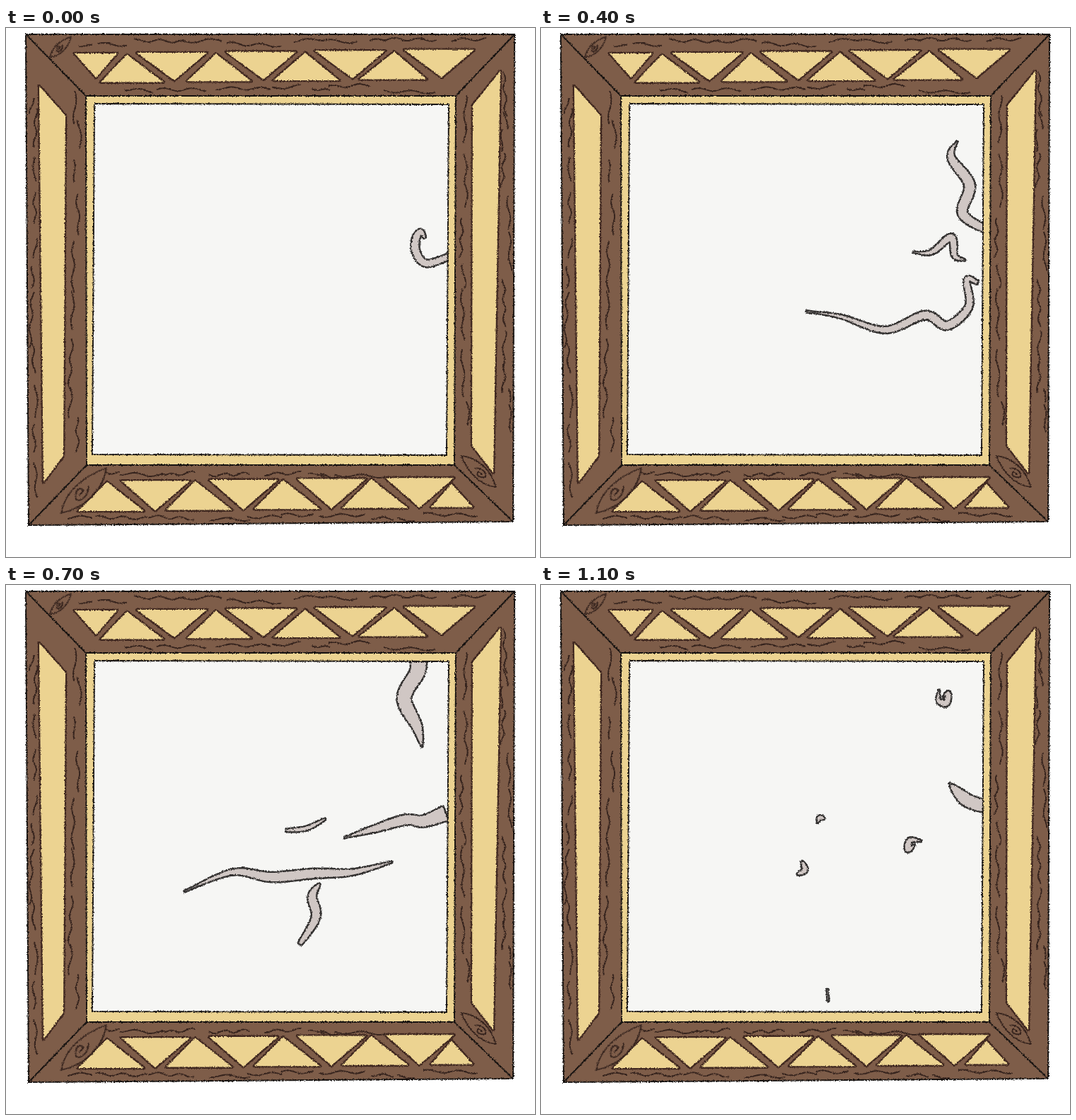
Write an HTML page that moves like this. It is 748 by 748 pixels and loops after 1200 ms.

```html
<!DOCTYPE html>
<html lang="en">
<head>
<meta charset="utf-8">
<title>Smoke in a wooden frame</title>
<style>
  html, body { margin: 0; width: 100%; height: 100%; overflow: hidden; background: #fff; }
  svg { display: block; width: 100vw; height: 100vh; }
  .ink { fill: none; stroke: #171311; stroke-width: 1.9; }
  .wood { fill: #7e5d49; stroke: #171311; stroke-width: 2; }
  .sand { fill: #ecd391; stroke: #171311; stroke-width: 1.9; }
  .inlay { fill: #ecd391; stroke: #402820; stroke-width: 4.6; stroke-linejoin: round; paint-order: stroke; }
  .grain { fill: none; stroke: #35231d; stroke-width: 1.9; stroke-linecap: round; vector-effect: non-scaling-stroke; }
  .paper { fill: #f6f6f4; }
  #edge { fill: none; stroke: #333130; stroke-width: 5; stroke-linejoin: round; }
  #body { fill: #d0c7c4; }
</style>
</head>
<body>
<svg viewBox="0 0 748 748">
  <defs>
    <filter id="rough" filterUnits="userSpaceOnUse" x="0" y="0" width="748" height="748" color-interpolation-filters="sRGB">
      <feTurbulence type="fractalNoise" baseFrequency="0.55" numOctaves="2" seed="4"/>
      <feDisplacementMap in="SourceGraphic" scale="3.4" xChannelSelector="R" yChannelSelector="G"/>
    </filter>
    <path id="pane" d="M125 107L626 108L623 604L122 603Z"/>
    <clipPath id="inside"><use href="#pane"/></clipPath>
  </defs>
  <g id="frame" filter="url(#rough)"></g>
  <use href="#pane" class="paper"/>
  <g clip-path="url(#inside)">
    <g filter="url(#rough)"><path id="edge"/><path id="body"/></g>
  </g>
  <g filter="url(#rough)"><use href="#pane" class="ink"/></g>
</svg>
<script>
const frame = document.getElementById('frame');
const mix = (a, b, u) => a + (b - a) * u;

function add(cls, d, transform = '') {
  const p = document.createElementNS('http://www.w3.org/2000/svg', 'path');
  p.setAttribute('class', cls);
  p.setAttribute('d', d);
  p.setAttribute('transform', transform);
  frame.append(p);
}

// Boards, mitres and side panels
add('wood', 'M28 9L719 9L717 698L32 703Z');
add('ink', 'M28 9L113 96M719 9L636 96M32 703L114 618M717 698L634 618');
add('sand', 'M113 96L636 96L634 618L114 618Z');
add('inlay', 'M47 82L84 124L81 605L53 642Z');
add('inlay', 'M699 61L660 109L659 590L689 629Z');

// Rows of triangles, rising slightly to the right
function triangle(left, right, tip, base, apex) {
  const rise = 0.011 * (left - 97);
  add('inlay', `M${left} ${base - rise}L${right} ${base - rise}L${tip} ${apex - rise}Z`);
}
triangle(97, 157, 127, 36, 70);
triangle(601, 660, 630, 683, 650);
for (let k = 0; k < 4; k++) {
  const top = 126 * k, low = 124.5 * k;
  triangle(134 + 122 * k, 223 + 124 * k, 171 + top, 77, 38);
  triangle(185 + top, 284 + top, 238 + top, 36, 75);
  triangle(102 + low, 195 + low, 143 + low, 683, 642);
  triangle(163 + low, 260 + low, 211 + low, 641, 683);
}

// Wood grain: wavy strokes scattered along lanes
let seed = 7;
const rand = () => (seed = seed * 16807 % 2147483647) / 2147483647;

function grain(x, y, length, vertical) {
  const wave = mix(26, 48, rand()), phase = rand() * 6.3, tilt = mix(-4, 4, rand());
  const pts = [];
  for (let s = 0; s <= length; s += 3) {
    const off = tilt * s / length + 2 * Math.sin(s / wave * 6.28 + phase);
    pts.push(vertical ? `${x + off} ${y + s}` : `${x + s} ${y + off}`);
  }
  add('grain', 'M' + pts.join('L'));
}

function lane(across, from, to, spread, vertical) {
  for (let pos = from; pos < to - 15;) {
    const length = Math.min(to - pos, mix(20, 80, rand()));
    const side = across + mix(-spread, spread, rand());
    if (vertical) grain(side, pos, length, true);
    else grain(pos, side, length, false);
    pos += length + mix(-8, 22, rand());
  }
}
lane(20, 103, 685, 5, false);
lane(86, 168, 616, 4, false);
lane(630, 142, 557, 3, false);
lane(691, 88, 680, 4, false);
lane(40, 100, 665, 3, true);
lane(98, 90, 600, 6, true);
lane(649, 96, 562, 5, true);
lane(707, 62, 572, 5, true);

// A knot is a leaf shape with a small ring
function knot(x, y, size, angle) {
  add('grain', 'M-.5 0C-.2 -.22 .2 -.2 .5 0C.2 .22 -.2 .14 -.5 0M-.1 0C0 -.12 .2 -.1 .18 0C.1 .1 0 .1 0 0L.1 0',
    `translate(${x} ${y}) rotate(${angle}) scale(${size})`);
}
knot(77, 27, 42, 135);
knot(110, 654, 90, 135);
knot(668, 627, 66, 42);

// Smoke wisps by step: [thickness, share left at the first end, at the last end, spine]
const wisps = [
  {
    0: [6.5, .4, .8, '592,296 586,288 579,300 581,320 596,333 629,322'],
    2: [9, 1.1, .5, '593,244 588,270 582,300 591,328 629,320'],
    4: [8.5, .1, .7, '588,161 580,183 606,222 596,262 629,285'],
    6: [8.5, .9, .2, '573,99 571,122 560,152 591,197 596,235 598,268'],
    7: [11, 1.2, .1, '582,99 582,122 563,160 581,200 588,228'],
    9: [6.5, .5, .2, '571,110 562,140 568,157 581,159 583,139 576,148'],
    11: [5.5, .2, .2, '563,149 562,163 573,167 576,153 569,158']
  },
  {
    2: [6, .2, 1.6, '524,286 540,289 558,284 575,264 594,245'],
    4: [6, .1, .3, '527,317 552,317 580,296 585,322 599,328'],
    6: [5, .2, .2, '448,337 470,336 487,327 516,323'],
    7: [4, .7, .5, '397,347 425,344 451,331'],
    9: [5, .8, .2, '392,337 394,326 405,326 405,340'],
    11: [4, .6, .2, '400,330 394,329 391,336']
  },
  {
    2: [6.5, .1, .6, '513,425 533,387 562,391 594,405 607,385 602,357 629,366'],
    4: [7, .1, .5, '376,401 424,408 487,427 543,406 574,421 605,394 602,356 617,360'],
    6: [10.5, .1, .5, '284,406 340,415 400,417 445,409 488,414 535,396 588,400'],
    7: [8, .1, .2, '253,433 320,406 375,413 435,408 490,406 545,392'],
    9: [6.5, .5, .3, '361,389 349,394 352,410 370,415 402,405'],
    11: [5, .4, .4, '369,391 373,403 363,409']
  },
  {
    6: [8, .1, 1.3, '429,491 434,470 431,440 443,418'],
    7: [7.5, .5, .3, '416,507 438,470 433,440 443,423'],
    9: [4.5, .2, .2, '414,558 417,540 410,518 412,498'],
    11: [1.5, 1, 1, '406,588 405,572']
  },
  {
    6: [5.5, .1, 1.1, '543,350 567,332 600,336 629,327'],
    7: [8, .1, 1.5, '479,357 520,345 565,332 590,334 621,323'],
    9: [7.5, .3, .1, '534,351 543,366 527,381 517,350 520,324 555,309 592,318'],
    11: [5.5, .3, .2, '528,368 519,374 522,361 537,362']
  },
  { 11: [10, .1, 1, '578,281 602,304 629,313'] },
  { 2: [4, .2, 1, '616,266 592,269'] },
  { 2: [4, .2, 1, '612,281 590,285'] }
];

const SAMPLES = 48, STEPS = 12, STEP_MS = 100;

// Catmull-Rom spine with a sine swell in thickness, as [x, y, half-width]
function sample([size, head, tail, spine]) {
  const k = spine.split(' ').map(p => p.split(',').map(Number)), last = k.length - 1;
  const at = i => k[Math.max(0, Math.min(last, i))];
  return Array.from({ length: SAMPLES + 1 }, (_, n) => {
    const v = n / SAMPLES, i = Math.min(last - 1, Math.floor(v * last)), u = v * last - i;
    const [x, y] = [0, 1].map(c => {
      const [a, b, d, e] = [-1, 0, 1, 2].map(o => at(i + o)[c]);
      return b + 0.5 * u * (d - a + u * (2 * a - 5 * b + 4 * d - e + u * (3 * (b - d) + e - a)));
    });
    return [x, y, size * mix(v < 0.5 ? head : tail, 1, Math.sin(Math.PI * v))];
  });
}

// Between two keys a wisp is halfway; before its first key it grows from its root
function pose(wisp, step) {
  if (wisp[step]) return sample(wisp[step]);
  if (!wisp[step + 1]) return null;
  const to = sample(wisp[step + 1]), [x, y] = to[SAMPLES];
  const from = wisp[step - 1] ? sample(wisp[step - 1]) : to.map(() => [x, y, 0]);
  return from.map((p, i) => p.map((v, c) => mix(v, to[i][c], 0.5)));
}

function outline(spine) {
  const left = [], right = [];
  spine.forEach(([x, y, w], i) => {
    const p = spine[Math.max(0, i - 1)], q = spine[Math.min(SAMPLES, i + 1)];
    const dx = q[0] - p[0], dy = q[1] - p[1], len = Math.hypot(dx, dy) || 1;
    const r = Math.max(0.2, w - 1.7), nx = -dy / len * r, ny = dx / len * r;
    left.push(`${x + nx} ${y + ny}`);
    right.unshift(`${x - nx} ${y - ny}`);
  });
  return `M${left.concat(right).join('L')}Z`;
}

const poses = Array.from({ length: STEPS }, (_, step) =>
  wisps.map(w => pose(w, step)).filter(Boolean).map(outline).join(''));

const edge = document.getElementById('edge'), body = document.getElementById('body');
const start = performance.now();
let shown = -1;

function draw() {
  const step = Math.floor((performance.now() - start) / STEP_MS) % STEPS;
  if (step !== shown) {
    edge.setAttribute('d', poses[step]);
    body.setAttribute('d', poses[step]);
    shown = step;
  }
  requestAnimationFrame(draw);
}
draw();
</script>
</body>
</html>
```
